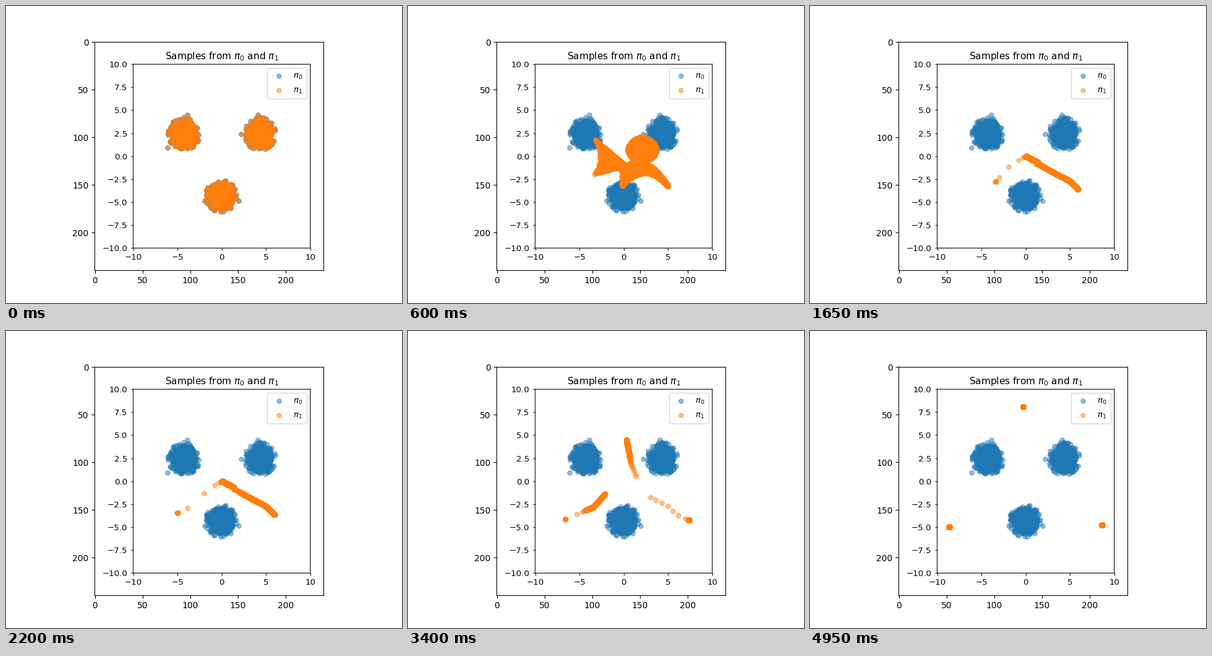
A matplotlib script for the animation above (5 s loop, 640 by 480 pixels).

```python
import numpy as np
import matplotlib.pyplot as plt
from matplotlib.animation import FuncAnimation
from matplotlib.patches import FancyBboxPatch

W, H, DPI = 640, 480, 100
FRAMES = 100
K = 0.924                       # scale of the inner plot
BLUE, ORANGE, INK = "#1f77b4", "#ff7f0e", "#333333"
PER_BLOB = 1000
FOLDED, LINED = 12, 33          # frames at which the clouds are folded, then a line

plt.rcParams["font.family"] = "DejaVu Sans"
rng = np.random.default_rng(4)
fig = plt.figure(figsize=(W / DPI, H / DPI), dpi=DPI, facecolor="white")


def add_axes(left, top, right, bottom):
    return fig.add_axes([left / W, 1 - bottom / H, (right - left) / W, (bottom - top) / H])


# ---- frames and ticks -------------------------------------------------
outer = add_axes(143.2, 57.6, 512.8, 427.2)
outer.set(xlim=(-0.5, 239.5), ylim=(239.5, -0.5),
          xticks=range(0, 240, 50), yticks=range(0, 240, 50))

inner = add_axes(205.5, 94.2, 491.7, 391.3)
inner.set(xlim=(-10, 10), ylim=(-10, 10),
          xticks=np.arange(-10, 11, 5), yticks=np.arange(-10, 10.1, 2.5))
inner.tick_params(labelsize=9.6, length=3.5 * K, width=1, pad=3.5 * K, color=INK)
inner.set_title(r"Samples from $\pi_0$ and $\pi_1$", fontsize=12 * K, pad=6 * K)
for spine in inner.spines.values():
    spine.set(linewidth=1, edgecolor=INK, snap=False)

# ---- overlay in stage pixels ------------------------------------------
stage = add_axes(0, 0, W, H)
stage.set(xlim=(0, W), ylim=(H, 0))
stage.axis("off")


def dots(xy, color, z):
    return stage.scatter(*xy.T, s=30, c=color, linewidths=0.7, alpha=0.5, zorder=z)


# ---- starting clouds --------------------------------------------------
def cloud(center, strays):
    g = rng.normal(size=(PER_BLOB, 2))
    g *= np.minimum(1, 2.9 / np.hypot(*g.T))[:, None]
    xy = np.array(center) + g * (8.6, 9)
    xy[:len(strays)] = strays
    return xy


clouds = [cloud((287, 206.5), [(261, 229), (293, 176)]),
          cloud((410.5, 206.5), [(380, 207), (407, 176)]),
          cloud((347.5, 306.5), [(321, 315), (376, 315)])]
start = np.vstack(clouds)


# ---- first fold: s runs left to right, q from -1 to 1 downwards -------
def wedge(s, q):
    return 301 + 50 * s + 9 * (1 - s) * (1 - q * q), 243 + 15 * s + q * (29 - 28 * s)


def disc(s, q):
    return 355 + 47 * s, 232 + 21 * q * np.sqrt(np.sin(np.pi * s))


def tail(s, q):
    return 345 + 75 * s, 278 - 77 * s + 90 * s * s + q * (16 - 14 * s)


def rank(v):
    return (np.argsort(np.argsort(v)) + 0.5) / len(v)


fold, order = [], []
for xy, shape, low in zip(clouds, (wedge, disc, tail), (0, 0.1, 0.15)):
    s, q = rank(xy[:, 0]), 2 * rank(xy[:, 1]) - 1
    fold.append(np.column_stack(shape(s, q)))
    width = 0.3 if shape is wedge else 1 - low
    order.append(low + width * s)
fold = np.vstack(fold)
order = np.argsort(np.concatenate(order))
jitter = rng.uniform(-0.7, 0.7, start.shape)


# ---- three routes from the line to the corners ------------------------
class Route:
    """Particles run along a path and catch up with a slowly moving head."""

    def __init__(self, ids, path, head, span, start, end, spread=0, lag=0, rush=0):
        self.ids, self.head, path = ids, head, np.array(path, float)
        self.path = path
        self.dist = np.r_[0, np.cumsum(np.hypot(*np.diff(path, axis=0).T))]
        place = np.arange(len(ids))             # 0 is the rearmost
        lead = place / (len(ids) - 1)
        early = rush / (1 + (place[::-1] / 5.0) ** 8)
        self.d0 = span * lead + 64 * early
        self.t0 = start - 15 * early
        self.t1 = end + spread * (1 - lead) + lag * np.exp(-place / 4) - 28 * early

    def at(self, frame):
        t = np.clip((frame - self.t0) / (self.t1 - self.t0), 0, 1) ** 2
        d = self.d0 + (np.interp(frame, *self.head) - self.d0) * t
        return np.column_stack([np.interp(d, self.dist, c) for c in self.path.T])


left, top, right = np.split(order, [int(0.22 * len(order)), int(0.42 * len(order))])
routes = [
    Route(left[::-1], [(360, 249), (350, 243), (341, 246), (325, 256), (300, 284),
                       (262, 301), (225, 316.5)],
          head=([33, 44, 99], [78, 103, 160]), span=14, start=48, end=72, spread=8, rush=1),
    Route(top, [(355, 246), (371, 254), (372, 243), (361, 217), (354, 181),
                (347, 136), (344, 121)],
          head=([77, 99], [138, 153]), span=15, start=44, end=73, spread=5, lag=12),
    Route(right, [(366, 254), (395, 270), (420, 283), (433, 296), (450, 304), (472, 313.5)],
          head=([33, 99], [80, 123]), span=80, start=33, end=61, lag=37),
]


def run(frame):
    xy = jitter.copy()
    for route in routes:
        xy[route.ids] += route.at(frame)
    return xy


line = run(LINED)


def positions(frame):
    if frame < FOLDED:
        return start + (fold - start) * frame / FOLDED
    if frame < LINED:           # collapses quickly, then settles
        t = (frame - FOLDED) / (LINED - FOLDED)
        return line + (fold - line) * (1 - t) ** 1.5
    return run(frame)


# ---- samples and legend -----------------------------------------------
dots(start, BLUE, 1)
moving = dots(start, ORANGE, 2)

stage.add_patch(FancyBboxPatch((422.5, 100.5), 64, 49.5,
                               boxstyle="round,pad=0,rounding_size=2.6",
                               facecolor="white", edgecolor="0.8",
                               linewidth=K, alpha=0.8, zorder=3))
for y, color, label in [(113, BLUE, r"$\pi_0$"), (136, ORANGE, r"$\pi_1$")]:
    dots(np.array([(441, y)]), color, 4)
    stage.text(464.5, y + 3.5, label, fontsize=9.6, va="baseline", zorder=4)


def update(frame):
    moving.set_offsets(positions(frame))
    return [moving]


anim = FuncAnimation(fig, update, frames=FRAMES, interval=50, repeat=True)
plt.show()
```
